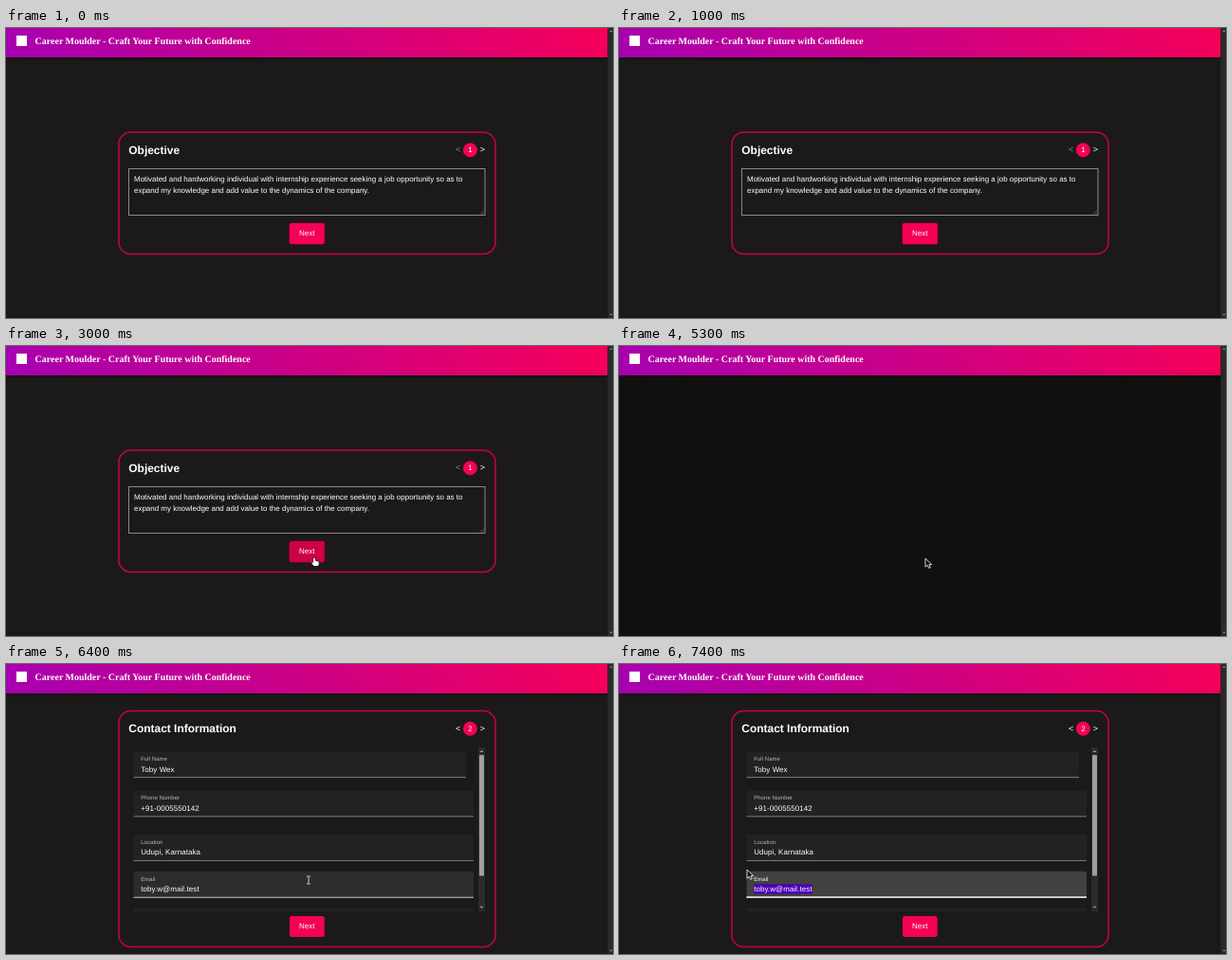
Write an HTML page with a canvas that moves like this. It is 640x306 px and loops after 8000 ms.

```html
<!DOCTYPE html>
<html lang="en">
<head>
<meta charset="utf-8">
<title>Form wizard</title>
<style>
  html, body { margin: 0; width: 100%; height: 100%; overflow: hidden; background: #1c1a19; }
  canvas { display: block; width: 640px; height: 306px; }
</style>
</head>
<body>
<canvas id="stage"></canvas>
<script>
const W = 640, H = 306, LOOP = 8000, STEP = 100;
const PINK = '#f50057', PAGE = '#1c1a19';
const SANS = '"Liberation Sans", Arial, sans-serif';
const SERIF = '"Liberation Serif", "Times New Roman", serif';
const SMALL = 5.98, BODY = 7.97, BRAND = 9.97, TITLE = 11.96;
const EMAIL = 'toby.w@mail.test';

const canvas = document.getElementById('stage');
const ratio = window.devicePixelRatio || 1;
canvas.width = W * ratio;
canvas.height = H * ratio;
const ctx = canvas.getContext('2d');
ctx.scale(ratio, ratio);
ctx.textRendering = 'geometricPrecision';

// Pointer keys: time, x, y
const moves = [
  [[2000, 198, 53], [2400, 308, 188.5]],
  [[2600, 308, 188.5], [2700, 312, 192], [2800, 319, 210], [2900, 323, 220], [3000, 325, 223.5]],
  [[5300, 323, 224], [5400, 323, 224]],
  [[5500, 324, 225], [6300, 324, 225], [6400, 319, 228], [6600, 293, 234]],
  [[6800, 293, 234], [6900, 272, 236], [7100, 205, 236], [7200, 172, 231], [7400, 135, 217]]
];

const clamp = v => Math.max(0, Math.min(1, v));
const mix = (a, b, k) => a + (b - a) * k;
const progress = (t, from, length) => clamp((t - from) / length);

function pointerAt(t) {
  const keys = moves.filter(m => m[0][0] <= t).pop();
  if (!keys) return null;
  for (let i = 1; i < keys.length; i++) {
    const [t0, x0, y0] = keys[i - 1], [t1, x1, y1] = keys[i];
    if (t <= t1) {
      const k = progress(t, t0, t1 - t0);
      return { x: mix(x0, x1, k), y: mix(y0, y1, k) };
    }
  }
  const [, x, y] = keys[keys.length - 1];
  return { x, y };
}

function rect(x, y, w, h, color) {
  ctx.fillStyle = color;
  ctx.fillRect(x, y, w, h);
}

function text(str, x, y, size, { color = '#fff', weight = '', family = SANS, align = 'left', spacing = 0 } = {}) {
  ctx.font = `${weight} ${size}px ${family}`;
  ctx.letterSpacing = spacing + 'px';
  ctx.textAlign = align;
  ctx.fillStyle = color;
  ctx.fillText(str, x, y);
}

function rounded(x, y, w, h, r) {
  ctx.beginPath();
  ctx.roundRect(x, y, w, h, r);
}

function polygon(points, color) {
  ctx.beginPath();
  points.forEach(([x, y]) => ctx.lineTo(x, y));
  ctx.closePath();
  ctx.fillStyle = color;
  ctx.fill();
}

function caret(x, y, dir, color, s = 2) {
  polygon([[x - s, y + dir * s / 2], [x + s, y + dir * s / 2], [x, y - dir * s / 2]], color);
}

function header() {
  ctx.save();
  ctx.shadowColor = 'rgba(0,0,0,.55)';
  ctx.shadowBlur = 4 * ratio;
  ctx.shadowOffsetY = ratio;
  const g = ctx.createLinearGradient(151, 182, 484, -151);
  g.addColorStop(0, '#a600b2');
  g.addColorStop(1, PINK);
  rect(0, 0, 634.5, 31, g);
  ctx.restore();
  rect(11, 8, 11, 11, '#fff');
  text('Career Moulder - Craft Your Future with Confidence', 30.6, 17.1, BRAND, { weight: 'bold', family: SERIF });
  rect(634.5, 0, 5.5, H, '#2a2a2a');
  caret(638, 3, 1, '#a0a0a0', 1.7);
  caret(638, 302.5, -1, '#a0a0a0', 1.7);
}

function card(y, h, title, page) {
  rounded(119, y + .5, 397, h, 12.5);
  ctx.lineWidth = 1.5;
  ctx.strokeStyle = '#ca004c';
  ctx.stroke();
  text(title, 129.3, y + 23.4, TITLE, { weight: 'bold' });

  const mid = y + 19.2;
  ctx.beginPath();
  ctx.arc(489.4, mid, 7.5, 0, Math.PI * 2);
  ctx.fillStyle = PINK;
  ctx.fill();
  text('<', 476.7, mid + 2.7, 9, { align: 'center', color: page === 1 ? '#8a8988' : '#fff' });
  text(page, 489.4, mid + 2.6, BODY, { align: 'center' });
  text('>', 502.4, mid + 2.7, 9, { align: 'center' });
}

function button(y, hover, rim) {
  if (rim) {
    rounded(298.3, y - .5, 38, 23, 3);
    ctx.fillStyle = '#8a0038';
    ctx.fill();
  }
  rounded(299, y, 36.7, 22, 2.2);
  ctx.fillStyle = `rgb(${mix(245, 205, hover)},0,${mix(87, 72, hover)})`;
  ctx.fill();
  text('Next', 317.3, y + 13.3, BODY, { align: 'center' });
}

function objective(t) {
  card(109.5, 128.5, 'Objective', 1);
  ctx.lineWidth = 1;
  ctx.strokeStyle = '#8b8a89';
  ctx.strokeRect(129.5, 148.5, 375.5, 49);
  text('Motivated and hardworking individual with internship experience seeking a job opportunity so as to', 135, 161.6, BODY);
  text('expand my knowledge and add value to the dynamics of the company.', 135, 173.5, BODY);
  ctx.strokeStyle = '#777';
  ctx.lineWidth = .6;
  ctx.beginPath();
  for (const d of [2, 4]) {
    ctx.moveTo(504 - d, 196.5);
    ctx.lineTo(504, 196.5 - d);
  }
  ctx.stroke();
  button(206, progress(t, 2700, 300), true);
}

function field(y, label, value, { right = 493, hover = 0, focus = 0, selectFrom = null } = {}) {
  const shade = mix(mix(.035, .08, hover), .17, focus);
  rounded(134.5, y, right - 134.5, 27.7, [2, 2, 0, 0]);
  ctx.fillStyle = `rgba(255,255,255,${shade})`;
  ctx.fill();
  rect(134.5, y + 27, right - 134.5, .8, `rgba(255,255,255,${mix(.5, .9, hover)})`);
  if (focus) {
    const half = (right - 134.5) / 2 * focus;
    rect(134.5 + (right - 134.5) / 2 - half, y + 26.6, half * 2, 1.2, '#fff');
  }
  text(label, 142.2, y + 9.8, SMALL, { color: focus ? '#fff' : '#b9b8b8', spacing: .06 });

  if (selectFrom !== null) {
    ctx.font = `${BODY}px ${SANS}`;
    ctx.letterSpacing = '0.08px';
    const end = 142.2 + ctx.measureText(value).width;
    let start = end;
    for (let i = value.length - 1; i >= 0; i--) {
      const x = 142.2 + ctx.measureText(value.slice(0, i)).width;
      if (x + 2 >= selectFrom) start = x;
    }
    rect(start, y + 13.5, end - start, 10.3, '#4b00b4');
  }
  text(value, 142.2, y + 21.2, BODY, { spacing: .08 });
}

function contact(t, pointer) {
  card(49, 249, 'Contact Information', 2);
  ctx.save();
  ctx.beginPath();
  ctx.rect(129, 88, 376, 173);
  ctx.clip();
  field(92.3, 'Full Name', 'Toby Wex', { right: 485 });
  field(133.5, 'Phone Number', '+91-0005550142');
  field(180, 'Location', 'Udupi, Karnataka');
  field(218.8, 'Email', EMAIL, {
    hover: progress(t, 5500, 200),
    focus: progress(t, 6800, 200),
    selectFrom: t >= 6900 ? pointer.x : null
  });
  field(257.5, '', '');
  ctx.restore();

  rect(498, 88, 7, 173, '#2b2b2b');
  rounded(499, 96, 5, 127.5, 1);
  ctx.fillStyle = '#9f9f9f';
  ctx.fill();
  caret(501.5, 92, 1, '#9f9f9f');
  caret(501.5, 256.7, -1, '#9f9f9f');
  button(266, 0, false);
}

const shapes = {
  arrow() {
    const path = new Path2D('M0 0V9.2L2.2 7.2L3.7 10.4L5.3 9.7L3.9 6.6H6.8Z');
    ctx.fillStyle = '#111';
    ctx.fill(path);
    ctx.strokeStyle = '#fff';
    ctx.lineWidth = .8;
    ctx.stroke(path);
  },
  beam() {
    ctx.strokeStyle = '#ddd';
    ctx.lineWidth = .9;
    ctx.stroke(new Path2D('M-2 -4H-.6L0 -3.5L.6 -4H2M0 -3.5V3.5M-2 4H-.6L0 3.5L.6 4H2'));
  },
  hand() {
    const path = new Path2D('M-.9 .7Q0 -.5 .9 .7V3.2Q1.8 2.7 2.3 3.6Q3.2 3.1 3.6 4Q4.7 3.6 4.8 4.8V6.6L4 8.6H-.5L-2.6 5.8Q-2.8 4.6 -1.8 4.8L-.9 5.6Z');
    ctx.strokeStyle = '#111';
    ctx.lineWidth = 1.2;
    ctx.stroke(path);
    ctx.fillStyle = '#fff';
    ctx.fill(path);
  }
};

function pointerShape(t, { x, y }) {
  if (t < 5300) {
    if (y > 206) return 'hand';
    return y > 148 && y < 198 ? 'beam' : 'arrow';
  }
  return t < 5500 || x < 142 ? 'arrow' : 'beam';
}

function draw(t) {
  const blank = t >= 5300 && t < 5500;
  const pointer = pointerAt(t);
  rect(0, 0, W, H, blank ? '#11100e' : PAGE);
  header();
  if (t < 5300) objective(t);
  else if (!blank) contact(t, pointer);
  if (pointer) {
    ctx.save();
    ctx.translate(pointer.x, pointer.y);
    shapes[pointerShape(t, pointer)]();
    ctx.restore();
  }
}

const begin = performance.now();
function tick() {
  const t = (performance.now() - begin) % LOOP;
  draw(Math.floor(t / STEP) * STEP);
  requestAnimationFrame(tick);
}
tick();
</script>
</body>
</html>
```
